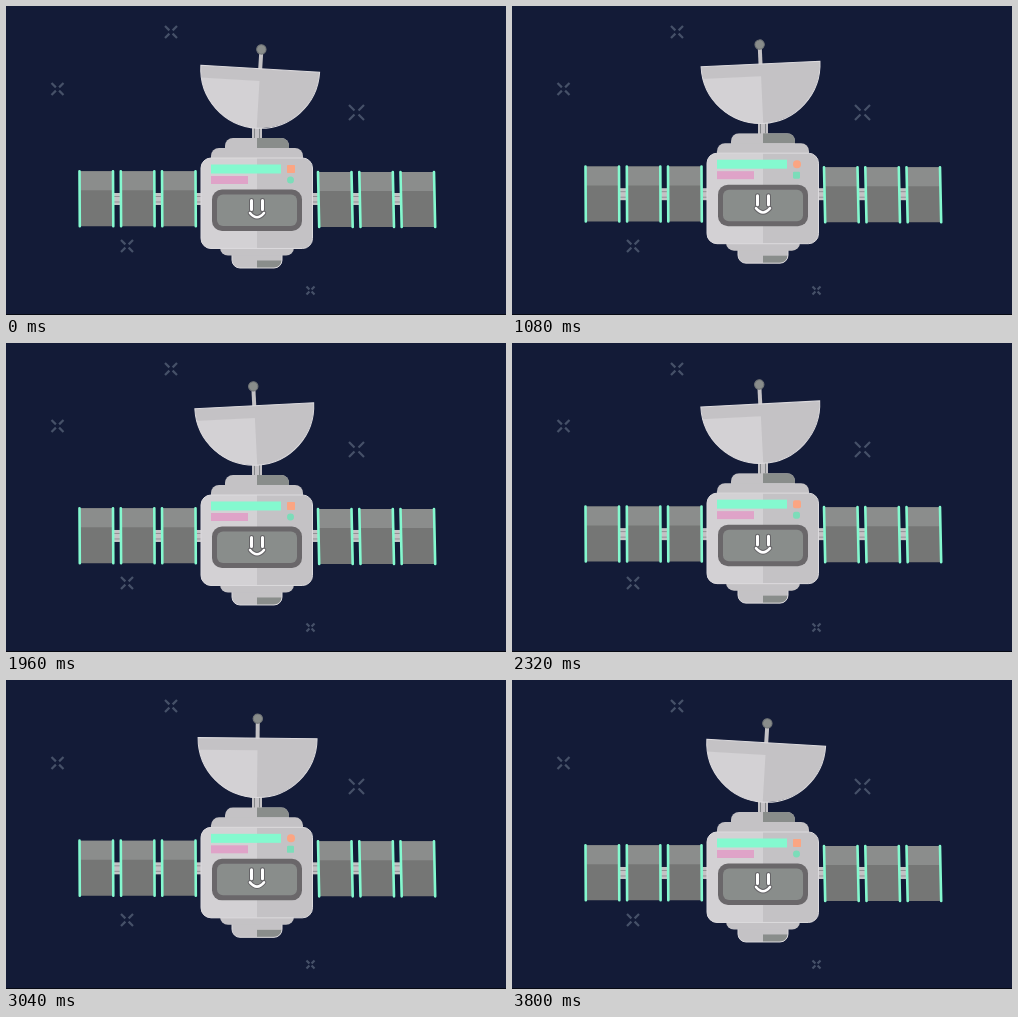
Recreate the animation shown at these times as an HTML page. Size 500 px wide and 309 px high, loop 3840 ms.

```html
<!DOCTYPE html>
<html lang="en">
<head>
<meta charset="utf-8">
<title>Satellite</title>
<style>
  html, body { margin: 0; width: 100%; height: 100%; overflow: hidden; background: #131b37; }
  svg { display: block; width: 100vw; height: 100vh; }
  .light { fill: #d3d1d4; }
  .mid { fill: #c4c2c5; }
  .dark { fill: #898d8b; }
  .edge { fill: none; stroke: #dcdadd; stroke-width: 1; }
  .face { fill: none; stroke-linecap: round; }
</style>
</head>
<body>
<svg viewBox="0 0 500 309">
  <defs>
    <clipPath id="bowl"><path d="M191.5 62.7h119a59.5 59.5 0 0 1-119 0z"/></clipPath>
    <clipPath id="cap"><rect x="219" y="132" width="64" height="24" rx="8"/></clipPath>
    <clipPath id="foot"><rect x="226" y="238" width="50" height="24" rx="8"/></clipPath>
    <clipPath id="hull"><rect x="195" y="152" width="111.5" height="90.5" rx="10"/></clipPath>
    <g id="smile" class="face">
      <path d="M244 207Q251 215.500 258 207"/>
    </g>
  </defs>
  <rect width="500" height="309" fill="#131b37"/>
  <g id="stars" stroke="#465168" stroke-width="2.2"></g>
  <rect y="308" width="500" height="1" fill="#070a14"/>

  <g id="craft">
    <rect class="mid" x="246" y="116" width="10" height="17"/>
    <path d="M248.500 116v17M253.500 116v17" stroke="#85878a"/>
    <g id="dish">
      <path d="M251 47v17" stroke="#c4c2c5" stroke-width="4"/>
      <circle class="dark" cx="251" cy="43.300" r="4.700" stroke="#717577"/>
      <g clip-path="url(#bowl)">
        <rect class="mid" x="191" y="62" width="120" height="61"/>
        <rect class="light" x="191" y="75" width="60" height="48"/>
      </g>
      <path class="edge" d="M191.500 62.700h119a59.500 59.500 0 0 1-119 0z"/>
    </g>

    <g id="wings"></g>

    <g clip-path="url(#cap)">
      <rect class="mid" x="219" y="132" width="64" height="24"/>
      <rect class="dark" x="251" y="132" width="32" height="10"/>
    </g>
    <rect class="mid" x="205" y="142" width="92" height="20" rx="8"/>
    <g clip-path="url(#foot)">
      <rect class="mid" x="226" y="238" width="50" height="24"/>
      <rect class="dark" x="251" y="254.500" width="25" height="8"/>
    </g>
    <rect class="edge" x="226" y="238" width="50" height="24" rx="8"/>
    <rect class="mid" x="214" y="230" width="74" height="19.500" rx="8"/>
    <g clip-path="url(#hull)">
      <rect class="mid" x="195" y="152" width="112" height="91"/>
      <rect class="light" x="195" y="152" width="56" height="91"/>
    </g>
    <rect class="edge" x="195" y="152" width="111.500" height="90.500" rx="10"/>

    <rect x="205" y="158.500" width="70" height="9" fill="#84f9cf"/>
    <rect x="205" y="170" width="37" height="8" fill="#dfa3c8"/>
    <rect id="lampA" x="281" y="159" width="8" height="8" fill="#fba583"/>
    <rect id="lampB" x="281" y="170.500" width="7" height="7" fill="#7cdcb9"/>

    <rect x="206" y="183.500" width="90" height="41.500" rx="10" fill="#6a676a"/>
    <rect class="dark" x="211" y="188.500" width="80" height="31.500" rx="6"/>
    <use href="#smile" stroke="#656467" stroke-width="4.600"/>
    <use href="#smile" stroke="#fff" stroke-width="2.600"/>
    <path id="eyesBack" class="face" stroke="#656467" stroke-width="5"/>
    <path id="eyes" class="face" stroke="#fff" stroke-width="3"/>
  </g>
</svg>
<script>
const LOOP = 3840, BOB = 1920;
const $ = id => document.getElementById(id);
const clamp = v => Math.min(1, Math.max(0, v));
const ease = v => (1 - Math.cos(Math.PI * clamp(v))) / 2;

const star = ([x, y, r]) => [[1, 1], [1, -1], [-1, 1], [-1, -1]].map(([a, b]) =>
  `<path d="M${x + a * r * .27} ${y + b * r * .27}L${x + a * r} ${y + b * r}"/>`).join('');
$('stars').innerHTML = [[165, 26, 6], [51.5, 83, 6], [350.5, 106.5, 7.5], [121, 240, 6], [304.5, 284.5, 4]]
  .map(star).join('');

const panel = (x, y, lean) => `
  <path d="M${x} ${y}h33.500l${lean} 55h-33.500z" fill="#757675"/>
  <path d="M${x} ${y}h33.500l${lean * .35} 19h-33.500z" fill="#8b8d8c"/>
  <path d="M${x} ${y}l${lean} 55m33.500 0l${-lean} -55" stroke="#84f9cf" stroke-width="2.600" stroke-linecap="round"/>`;
const strut = x => `
  <rect class="mid" x="${x}" y="187" width="11" height="12"/>
  <path d="M${x} 190.500h11M${x} 196h11" stroke="#918f95"/>`;
$('wings').innerHTML = [105, 147, 188, 304, 345, 386].map(strut).join('') +
  [73.5, 114.8, 156].map(x => panel(x, 165.3, .3)).join('') +
  [312, 353.3, 394.5].map(x => panel(x, 166, 1.2)).join('');

function draw(now) {
  const t = now % LOOP, u = t % BOB;
  const lift = (1 - Math.cos(2 * Math.PI * u / BOB)) / 2;
  $('craft').setAttribute('transform', `translate(0 ${-5 * lift})`);

  const swing = ease(t / 1250) - ease((t - 2370) / 1250);
  $('dish').setAttribute('transform', `rotate(${3.4 - 6.3 * swing} 251 117)`);

  const open = .1 + .9 * clamp((Math.abs(u - 625) - 40) / 200);
  const top = 203.5 - 9 * open;
  const eyes = `M245.500 ${top}V203.500M256.500 ${top}V203.500`;
  $('eyes').setAttribute('d', eyes);
  $('eyesBack').setAttribute('d', eyes);

  $('lampA').setAttribute('rx', .8 + 3.2 * lift);
  $('lampB').setAttribute('rx', 3.5 - 2.5 * lift);
  requestAnimationFrame(() => draw(performance.now()));
}
draw(0);
</script>
</body>
</html>
```
